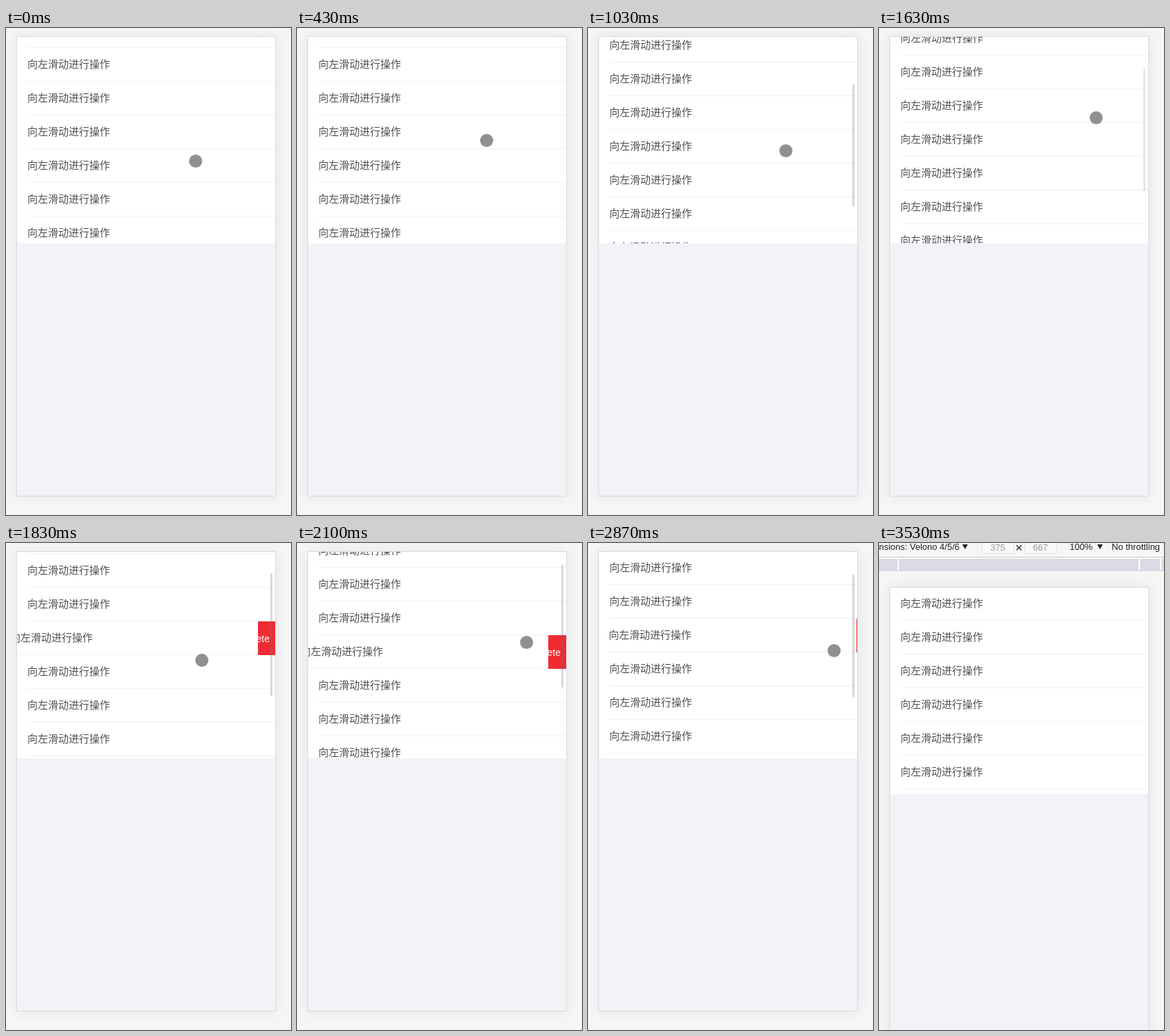
These frames come from a looping animation (414 by 708 pixels, 3.91 s). An HTML page:

```html
<!DOCTYPE html>
<html lang="zh-CN">
<head>
<meta charset="utf-8">
<title>Swipe list</title>
<style>
@property --s { syntax: "<integer>"; inherits: true; initial-value: 131; }
@property --x { syntax: "<integer>"; inherits: true; initial-value: 275; }
@property --y { syntax: "<integer>"; inherits: true; initial-value: 193; }
@property --open { syntax: "<integer>"; inherits: true; initial-value: 0; }

* { box-sizing: border-box; }
html, body { margin: 0; width: 100%; height: 100%; overflow: hidden; background: #f5f7f6; }
body { position: relative; }
.page, .page div, .page span { position: absolute; }
.page { inset: 0; animation: shift 3910ms step-end infinite; }

/* device frame */
.phone {
  left: 15px; top: 12px; width: 377px; height: 669px;
  background: #f3f2f8; border: 1px solid #d9dbdb;
  box-shadow: 0 0 20px rgba(0, 0, 0, .08);
}
.list {
  left: 0; top: 0; width: 375px; height: 300px;
  overflow: hidden; background: #fff;
  animation: scroll 3910ms linear infinite;
}
.rows { left: 0; top: calc(var(--s) * -1px); width: 375px; }
.rows .row { position: relative; height: 49px; }
.cell {
  inset: 0; padding-left: 15px; background: #fff; color: #505052;
  font: 15px/46px "Noto Sans CJK SC", "Noto Sans CJK", sans-serif; white-space: nowrap;
}
.cell::after {
  content: ""; position: absolute; left: 15px; right: 0; bottom: 0;
  height: 1px; background: #f1f1f2;
}
.swiped { animation: swipe 3910ms linear infinite; }
.swiped .cell { transform: translateX(calc(var(--open) * -1px)); }
.action {
  right: 0; top: 0; width: 57px; height: 49px; padding-right: 8px;
  background: #f12b33; color: #fff; text-align: right;
  font: 14px/50px "Liberation Sans", Arial, sans-serif;
}
.thumb {
  left: 368px; top: calc(3.5px + var(--s) * .597px); width: 3px; height: 178px;
  border-radius: 1px; background: rgba(105, 115, 115, .28);
  animation: thumb 3910ms linear infinite;
}
.touch {
  left: calc(var(--x) * 1px - 9px); top: calc(var(--y) * 1px - 9px);
  width: 19px; height: 19px; border-radius: 50%; background: #909090;
  animation: touch 3910ms linear infinite, hide 3910ms step-end infinite;
}

/* toolbar above the stage */
.bar {
  left: 0; top: -52px; width: 414px; height: 41px;
  font: 13px/16px "Liberation Sans", Arial, sans-serif; color: #222; white-space: nowrap;
}
.bar span { top: -2px; }
.bar .field {
  top: -6px; width: 47px; height: 22px; padding-top: 4px;
  border: 1px solid #e3e6e6; background: #f8f9fa; color: #999; text-align: center; line-height: 15px;
}
.edge { left: 0; top: 20px; width: 414px; height: 1px; background: #c8cccc; }
.ruler { left: 0; top: 23px; width: 414px; height: 18px; background: #dadbe4; }
.ruler div { top: 0; width: 2px; height: 16px; background: #fff; }
.arrow {
  top: 2px; border: solid transparent; border-width: 7px 4.5px 0;
  border-top-color: #222; width: 0; height: 0;
}

@keyframes scroll {
  0%, 11.51% { --s: 131; }
  18.67% { --s: 170; animation-timing-function: ease-out; }
  20.46% { --s: 178; animation-timing-function: ease-in-out; }
  30.69%, 43.99% { --s: 71; }
  49.1%, 59.59% { --s: 26; }
  62.15% { --s: 13; animation-timing-function: ease-out; }
  64.45% { --s: 6; animation-timing-function: ease-in-out; }
  71.61%, 100% { --s: 50; }
}
@keyframes touch {
  0%, .77% { --x: 275; --y: 193; }
  5.88%, 9.46% { --x: 274; --y: 172; }
  18.67% { --x: 280; --y: 118; animation-timing-function: ease-out; }
  20.46% { --x: 281; --y: 110; animation-timing-function: ease-in-out; }
  30.69% { --x: 290; --y: 217; animation-timing-function: ease-in-out; }
  35.81% { --x: 321; --y: 121; }
  36.57%, 41.67% { --x: 322; --y: 122; }
  41.68% { --x: 315; --y: 130; }
  43.99% { --x: 305; --y: 145; }
  49.1% { --x: 268; --y: 190; animation-timing-function: ease-in-out; }
  53.71% { --x: 333; --y: 144; }
  57.54% { --x: 325; --y: 171; }
  59.59% { --x: 317; --y: 186; }
  62.15% { --x: 310; --y: 199; animation-timing-function: ease-out; }
  64.45% { --x: 318; --y: 206; animation-timing-function: ease-in-out; }
  71.61% { --x: 352; --y: 162; }
  73.4%, 100% { --x: 357; --y: 156; }
}
@keyframes swipe {
  0%, 43.99% { --open: 0; }
  49.1% { --open: 45; }
  53.71% { --open: 26; }
  55.5% { --open: 15; animation-timing-function: ease-out; }
  62.15% { --open: 3; }
  66.5%, 76.7% { --open: 1; }
  76.73%, 100% { --open: 0; }
}
@keyframes thumb {
  0%, 11.5% { opacity: 0; }
  11.51%, 41.67% { opacity: 1; }
  41.68% { opacity: .6; }
  43.9% { opacity: .3; }
  43.99%, 75.96% { opacity: 1; }
  79.28%, 100% { opacity: 0; }
}
@keyframes shift {
  0% { transform: none; }
  84.39% { transform: translateY(12px); }
  87.46% { transform: translateY(36px); }
  90.28%, 100% { transform: translateY(52px); }
}
@keyframes hide {
  0% { visibility: visible; }
  84.39%, 100% { visibility: hidden; }
}
</style>
</head>
<body>
<div class="page">
  <div class="bar">
    <span style="right:297px">Dimensions: Velono 4/5/6</span>
    <div class="arrow" style="left:121px"></div>
    <div class="field" style="left:149px">375</div>
    <span style="left:198px;top:-1px;font-size:18px">×</span>
    <div class="field" style="left:211px">667</div>
    <span style="left:277px">100%</span>
    <div class="arrow" style="left:317px"></div>
    <span style="left:338px">No throttling</span>
    <div class="edge"></div>
    <div class="ruler">
      <div style="left:27px"></div><div style="left:377px"></div><div style="left:408px"></div>
    </div>
  </div>
  <div class="phone">
    <div class="list">
      <div class="rows"></div>
      <div class="thumb"></div>
    </div>
  </div>
  <div class="touch"></div>
</div>
<script>
const rowCount = 10, swipedRow = 3;
const cell = '<div class="cell">向左滑动进行操作</div>';
const action = '<div class="action">Delete</div>';
document.querySelector('.rows').innerHTML = Array.from({ length: rowCount }, (_, i) =>
  i === swipedRow
    ? `<div class="row swiped">${action}${cell}</div>`
    : `<div class="row">${cell}</div>`
).join('');
</script>
</body>
</html>
```
